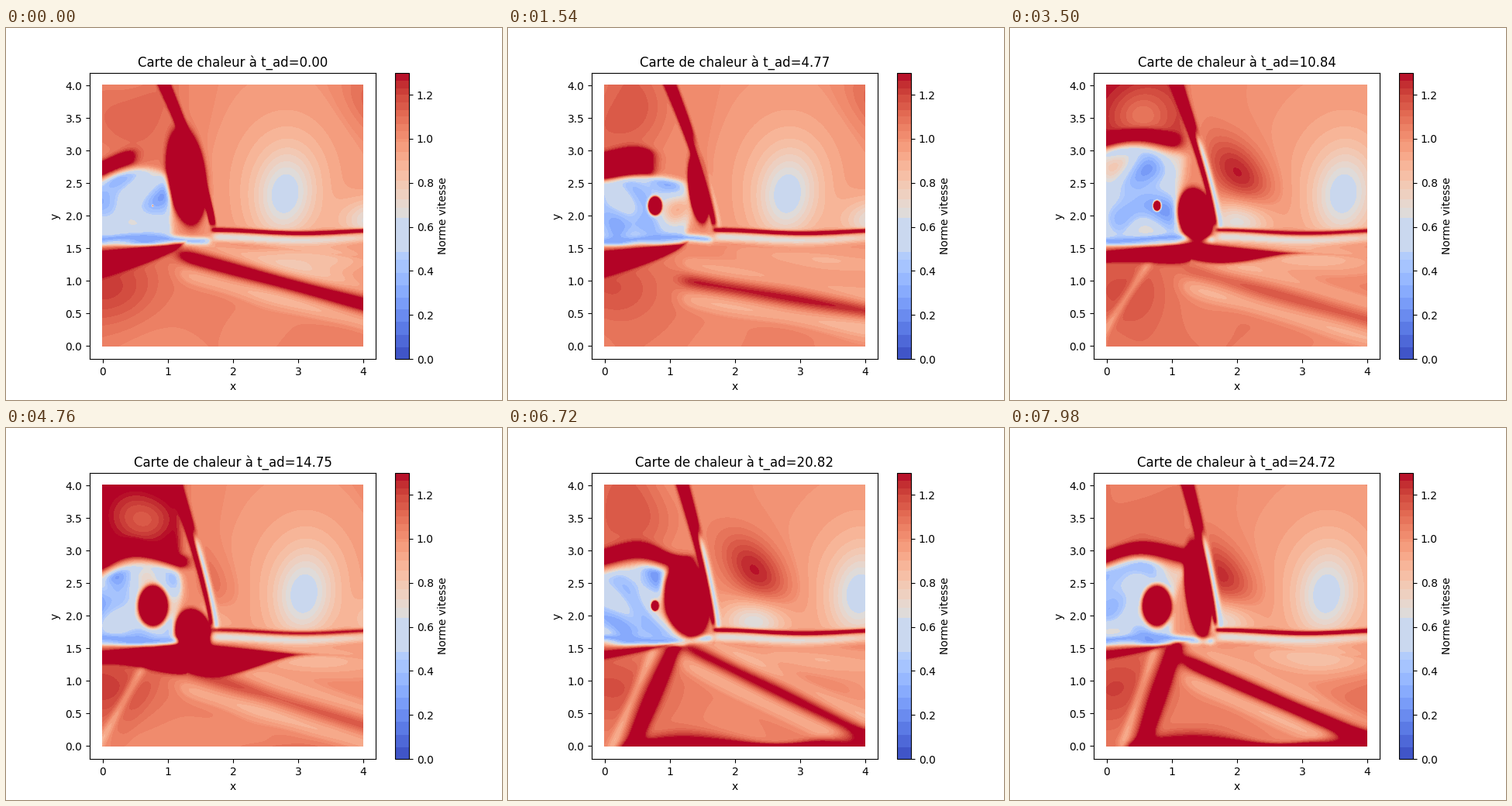
These frames come from a looping animation (640 px wide and 480 px high, 8 s). A matplotlib script:

```python
import numpy as np
import matplotlib.pyplot as plt
from matplotlib.animation import FuncAnimation
from matplotlib.colors import ListedColormap

N = 240                      # grid cells per side
SIDE, VMAX = 4.0, 1.3
TICK, FRAMES, HOLD = 40, 200, 140
DT = 0.4337                  # dimensionless time per step

axis = (np.arange(N) + 0.5) * SIDE / N
X, Y = np.meshgrid(axis, axis)

# Key values of the few parts that do not follow a simple rule
TIMES = (0, 3.04, 7.37, 10.84, 14.75, 20.82, 24.72)
ROOF = (2.6, 2.45, 2.75, 2.95, 2.7, 2.7, 2.72)
CORE_Y = (2.6, 2.6, 2.1, 2.0, 1.75, 2.25, 2.4)
CORE_H = (.75, .7, .25, .42, .35, .6, .75)
CORE_W = (.3, .2, .08, .28, .28, .36, .2)
STREAK = (1.45, 1.1, .95, 1.25, 1.25, 1.65, 1.4)


def track(t, keys):
    """Ease between key values."""
    i = min(np.searchsorted(TIMES, t, side="right") - 1, len(TIMES) - 2)
    f = (t - TIMES[i]) / (TIMES[i + 1] - TIMES[i])
    return keys[i] + (keys[i + 1] - keys[i]) * f * f * (3 - 2 * f)


def rise(z, mid=0, width=.04):
    return 0.5 + 0.5 * np.tanh((z - mid) / width)


def bell(z, width):
    return np.exp(-(z / width)**2)


def gauss(x, y, rx, ry, deg=0):
    c, s = np.cos(np.radians(deg)), np.sin(np.radians(deg))
    return bell((X - x) * c + (Y - y) * s, rx) * bell((Y - y) * c - (X - x) * s, ry)


def disc(x, y, rx, ry, soft=.15):
    return rise(1 - np.hypot((X - x) / rx, (Y - y) / ry), 0, soft)


def over(v, val, a):
    return v + (val - v) * a


def eddies(t, scale, seed, count=6):
    """Seeded plane waves, bent and slowly drifting."""
    rng = np.random.default_rng(seed)
    bx, by = X + .12 * np.sin(4 * Y + .5 * t), Y + .12 * np.sin(4 * X - .4 * t)
    total = 0
    for _ in range(count):
        ang, shift = rng.uniform(0, 2 * np.pi, 2)
        k = scale * rng.uniform(.6, 1.4)
        total = total + np.sin(k * (bx * np.cos(ang) + by * np.sin(ang)) + shift + .8 * t)
    return total / np.sqrt(count)


def wave(t, spacing=3.0):
    """Fast and slow cells carried to the right above the wake."""
    w = np.zeros((N, N))
    for x in (1.2 + .63 * t) % spacing + spacing * np.arange(-1, 2):
        on = rise(x, 1.5, .25)
        y = 2.6 + .16 * (x - 1.8) + max(0, x - 3.5)
        w += .28 * on * (1 - .6 * rise(x, 3.9, .3)) * gauss(x, y, .65, .38, -50)
        w -= .36 * on * gauss(x, 1.92, .5, .33)
        slow = x + 1.6
        on, slow = rise(slow, 1.3, .2), max(slow, 1.75)
        w -= on * (.27 * gauss(slow, 2.3, .42, .62, -8) + .16 * gauss(slow, 2.5, .85, 1.1))
    return w * rise(Y, 1.74, .05) * rise(X, 1.5, .1)


def lower_flow(t):
    """Diagonal streaks under the jet, and the rays growing from the floor."""
    late = rise(t, 18, 2)
    v = .04 + .03 * eddies(t, 2.5, 5) - .18 * gauss(3.2, 1.35, 1.1, .25, -4)
    start, end = track(t, STREAK), .65 - .022 * t
    d = Y - start - (end - start) * (X - 1) / 3
    amp = .1 + .38 * ((t - 12) / 12)**2
    v += rise(X, 1.2, .15) * (amp * bell(d, .11) - .14 * bell(d + .28, .14) - .1 * bell(d - .26, .13))
    foot = .03 * t - .2
    ray = X - foot - (1 - foot) * Y / 1.35
    v += .5 * late * bell(ray, .13) - .16 * rise(t, 9, 1.5) * bell(ray + .3, .08)
    v += .5 * late * bell(Y, .12 + .07 * np.sin(2.3 * X - 1.4)) * rise(X, .4, .2)
    return v * rise(1.6 - Y, 0, .06)


def field(t):
    mid = bell(t - 13.3, 3)
    swirl, fine = eddies(t, 4, 1), eddies(t, 8, 2)
    roof = track(t, ROOF) + .07 * swirl + .1 * np.sin(np.pi * np.minimum(X, 1.2))
    v = 1 + wave(t) + lower_flow(t)
    v += .12 * gauss(.3, 3.5, .9, .9) + .15 * gauss(.1, .9, .8, .6)
    v += .04 * swirl * rise(1.2 - X, 0, .2) * rise(Y, 2.5, .2)

    # slow chamber on the left with its fast lid
    hole = 1 - gauss(.55, 3.5, .5, .42)
    v = over(v, 1.5, mid * hole * rise(1.2 - X, 0, .08) * rise(Y - roof, .15, .06))
    inside = rise(Y, 1.55, .03) * rise(roof - Y, 0, .06) * rise(1.15 + .12 * swirl - X, 0, .07)
    v = over(v, np.maximum(.48 + .17 * fine + .08 * swirl, .1), inside)
    thick = .1 + .1 * bell(t - 5, 3)
    lid = rise(thick - abs(Y - roof - .2), 0, .05)
    v = over(v, 1.5, lid * rise(min(.5 + .055 * t, 1.35) - X, 0, .1))
    r = (.13 + .1 * np.cos(2 * np.pi * (t - 14.75) / 10)) * rise(t, 5, 2)
    v = over(v, 1.5, disc(.78, 2.15, r + .01, 1.4 * r + .01))
    lip = bell(Y - 1.64 - .03 * np.sin(3 * X + t), .055)
    v = over(v, .28, .9 * lip * rise(1.65 - X, 0, .06))

    # fast front, from the top edge down to the start of the wake
    w = track(t, CORE_W)
    v = over(v, 1.55, disc(1.63 - w + .1 * (2.2 - Y), track(t, CORE_Y), w, track(t, CORE_H)))
    top = .95 + .012 * t
    front = X - 1.7 + (1.7 - top) * np.clip((Y - 1.8) / 2.2, 0, 1)**1.3
    v = over(v, 1.5, np.exp(-(front / (.05 + .025 * (Y - 1.8)))**4) * rise(Y, 1.85, .05))
    rim = bell(front - .05, .045) * rise(Y, 1.8, .05) * rise(3.2 - Y, 0, .15)
    v = over(v, .45, .85 * rise(t, 5, 1.5) * rim)

    # wake line with a slow layer below it
    wake = 1.755 + .025 * np.cos(2.3 * (X - 1.7))
    v = over(v, .58, .85 * bell(Y - wake + .11, .07) * rise(X, 1.7, .05) * rise(4.2 - X, 0, 1))
    v = over(v, 1.5, (1 - .4 * mid) * bell(Y - wake, .035) * rise(X, 1.68, .03))

    # jet entering from the left, swelling downstream half-way through
    half = (.24 - .14 * rise(t, 9, 1.2)) * np.sqrt(np.clip(1 - X / 1.3, 0, 1))
    half = half + .36 * mid * bell(X - 1.6, 1.1)
    crest = 1.5 + .1 * np.minimum(X, 1.3) - .1 * np.maximum(X - 1.3, 0)
    return over(v, 1.55, rise(half - abs(Y - crest + half), .05, .04))


# Uneven colour steps: coarse in the blues, fine in the reds
steps = np.concatenate([np.arange(0, .48, .056), [.485], np.arange(.64, 1, .043),
                        np.arange(1, VMAX, .033)])
entry = (np.arange(260) + .5) * VMAX / 260
slot = np.searchsorted(steps, entry)
ends = np.append(steps, VMAX)
shade = (ends[slot - 1] + ends[slot]) / 2
shade[entry > steps[-1]] = VMAX
cmap = ListedColormap(plt.get_cmap("coolwarm")(shade / VMAX))

fig, ax = plt.subplots(figsize=(6.4, 4.8), dpi=100)
image = ax.imshow(field(0), origin="lower", extent=(-.01, SIDE, -.007, SIDE + .005), cmap=cmap,
                  vmin=0, vmax=VMAX, interpolation="bilinear", interpolation_stage="data")
ax.set(xlim=(-.1995, 4.1895), ylim=(-.2, 4.2), xlabel="x", ylabel="y",
       xticks=range(5), yticks=np.arange(0, 4.1, .5))
fig.colorbar(image, ax=ax, label="Norme vitesse")
title = ax.set_title("Carte de chaleur à t_ad=0.00")
shown = {"step": 0}


def update(i):
    step = (i * TICK + TICK - 1) // HOLD
    if step != shown["step"]:
        shown["step"] = step
        image.set_data(field(step * DT))
        title.set_text(f"Carte de chaleur à t_ad={step * DT:.2f}")
    return image, title


anim = FuncAnimation(fig, update, frames=FRAMES, interval=TICK, repeat=True,
                     repeat_delay=0, cache_frame_data=False)
plt.show()
```
